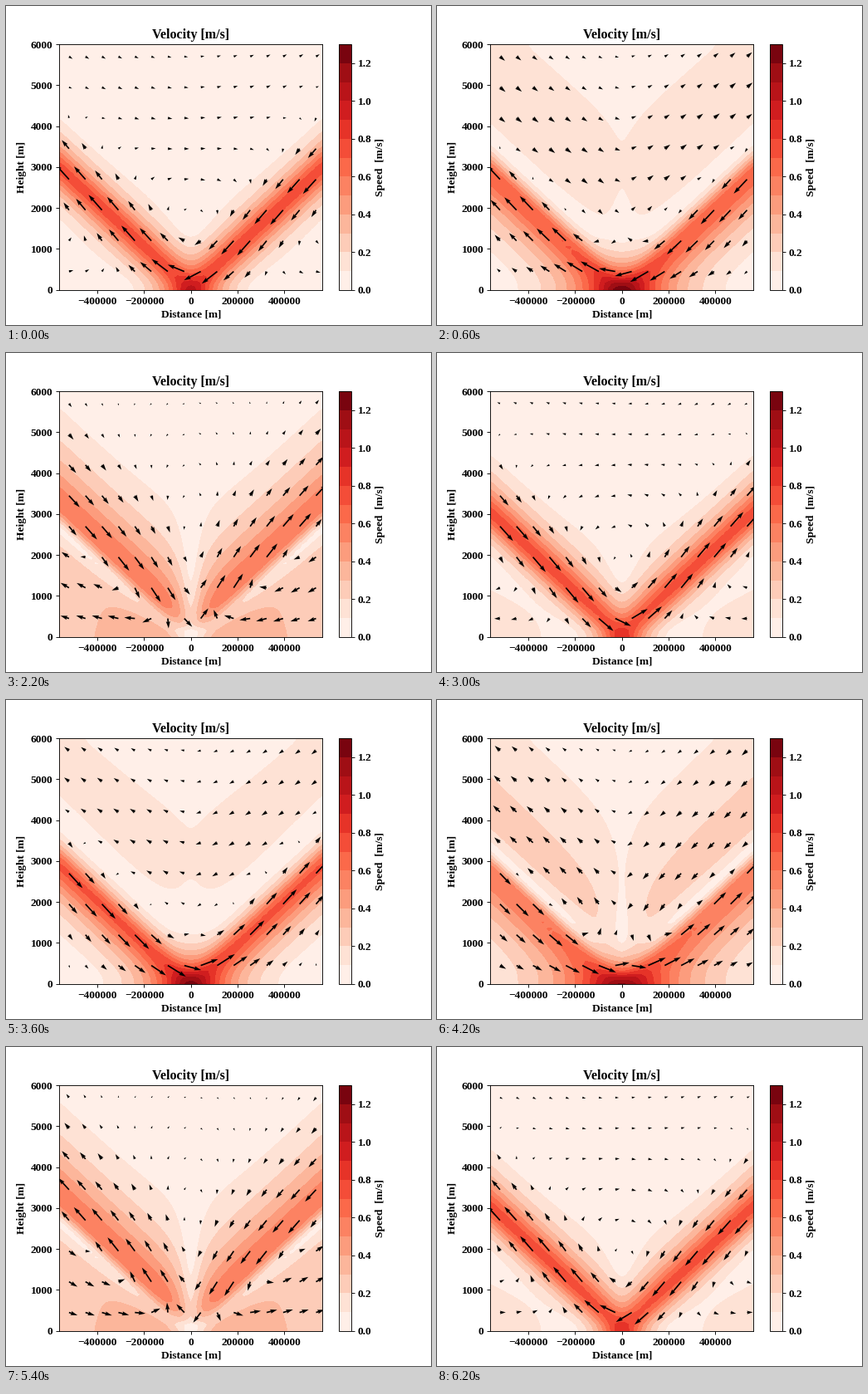
A matplotlib script that plays this animation: 512x384 px, repeating every 6.4 s.

```python
import numpy as np
import matplotlib.pyplot as plt
from matplotlib.animation import FuncAnimation

plt.rcParams.update({
    "font.family": "Liberation Serif",
    "font.size": 12,
    "font.weight": "bold",
    "axes.labelweight": "bold",
    "axes.titleweight": "bold",
})

FRAMES = 32
INTERVAL = 200
AMPLITUDE = 0.835    # velocity scale, m/s
COAST_WIDTH = 0.2    # width of the heating gradient, scaled
DEPTH = 1500.0       # heating depth, m
OMEGA = 7.3e-5
CORIOLIS = 5e-5
BUOYANCY = 0.01
LENGTH = DEPTH * BUOYANCY / np.sqrt(OMEGA**2 - CORIOLIS**2)
ARROW_POWER = 0.65   # compresses the range of arrow lengths

xi = np.linspace(-2, 2, 81)
zeta = np.linspace(0, 4, 41)
x, z = xi * LENGTH, zeta * DEPTH
levels = np.linspace(0, 1.3, 14)
sparse = slice(3, None, 5)

# Wavenumber quadrature for the linear wave response to coastal heating
dk = 0.02
k = np.arange(0, 60, dk)
weight = np.exp(-COAST_WIDTH * k) / (1 + k**2) * dk
weight[0] /= 2
cos_x = weight * np.cos(np.outer(xi, k))
phase = np.outer(k, zeta)
decay = np.exp(-zeta)


def velocity(tau):
    psi = -AMPLITUDE * (cos_x @ (np.sin(phase + tau) - decay * np.sin(tau))).T
    dpsi_dz, dpsi_dx = np.gradient(psi, zeta, xi)
    return dpsi_dz, -dpsi_dx


def fill_speed(u, w):
    speed = np.minimum(np.hypot(u, w), levels[-1] - 1e-3)
    return ax.contourf(x, z, speed, levels, cmap="Reds")


def arrow_part(v):
    v = v[sparse, sparse]
    return np.sign(v) * np.abs(v) ** ARROW_POWER


fig, ax = plt.subplots(figsize=(6.4, 4.8), dpi=80)
u0, w0 = velocity(0)
filled = fill_speed(u0, w0)
arrows = ax.quiver(x[sparse], z[sparse], arrow_part(u0), arrow_part(w0),
                   scale=12, zorder=3)
bar = fig.colorbar(filled, ax=ax, ticks=np.arange(0, 1.3, 0.2))
bar.ax.set_yticklabels([f"{v:.1f}" for v in np.arange(0, 1.3, 0.2)])
bar.set_label("Speed  [m/s]")
ax.set(title="Velocity [m/s]", xlabel="Distance [m]", ylabel="Height [m]",
       xlim=(x[0], x[-1]), ylim=(z[0], z[-1]),
       xticks=np.arange(-400000, 400001, 200000))
ax.ticklabel_format(style="plain")


def update(frame):
    global filled
    u, w = velocity(2 * np.pi * frame / FRAMES)
    filled.remove()
    filled = fill_speed(u, w)
    arrows.set_UVC(arrow_part(u), arrow_part(w))
    return filled, arrows


anim = FuncAnimation(fig, update, frames=FRAMES, interval=INTERVAL,
                     init_func=lambda: (filled, arrows),
                     repeat=True, repeat_delay=0, blit=False)
plt.show()
```
